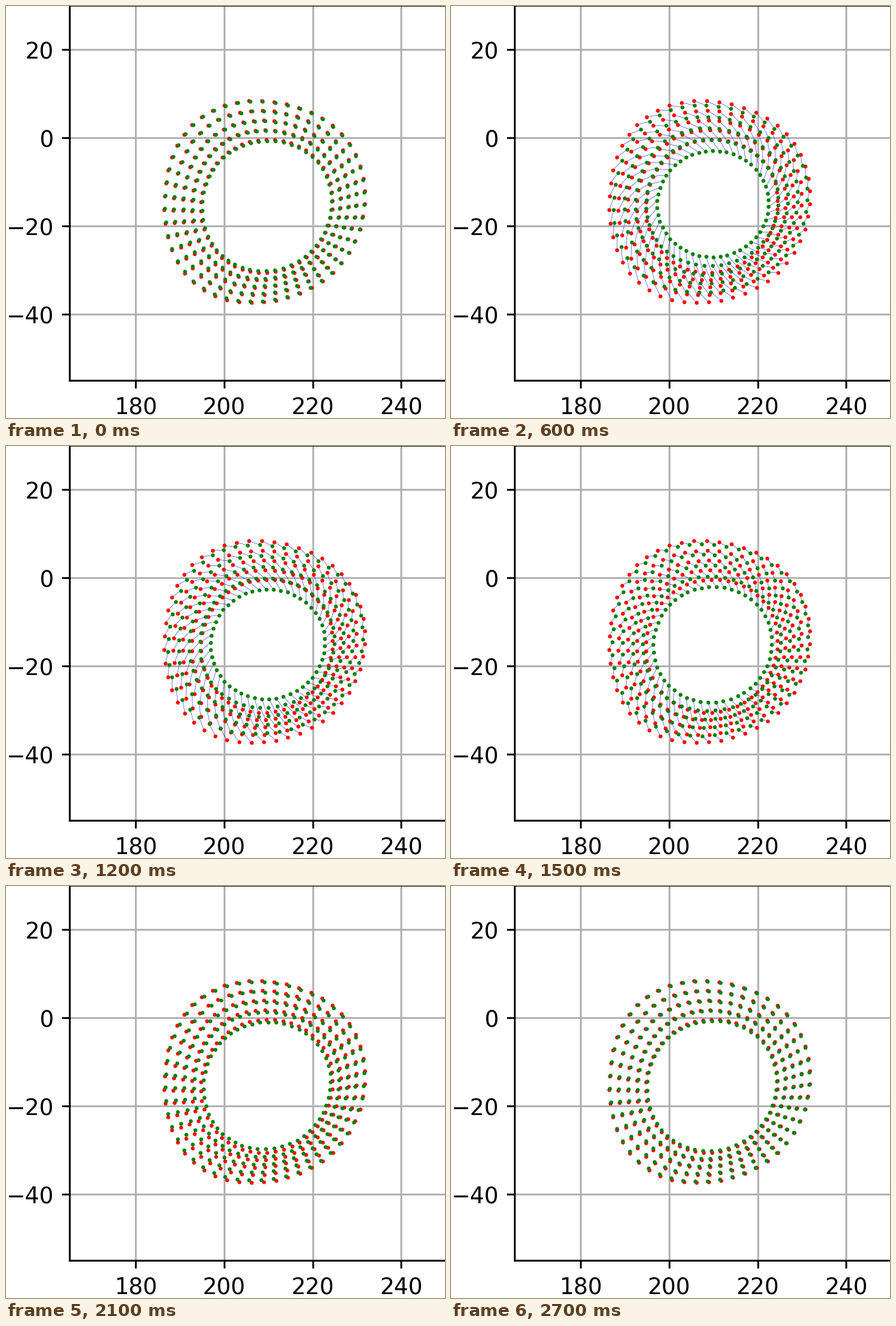
Recreate the animation shown at these times as a matplotlib script. Size 678 by 635 pixels, loop 2850 ms.

```python
import numpy as np
import matplotlib.pyplot as plt
from matplotlib.animation import FuncAnimation
from matplotlib.collections import LineCollection

WIDTH, HEIGHT, DPI = 678, 635, 250
RINGS, SPOKES = 5, 50

# Contraction of the ring over one cycle, one value per 150 ms step
CYCLE = [.08, .17, .36, .58, .78, .93, 1, .85, .67, .57,
         .50, .44, .38, .27, .17, .13, .10, .085, .08]

# Resting contours, counter-clockwise from the top, every fifth spoke
OUTER = [208.46 + 8.31j, 194.85 + 4.78j, 187.39 - 7.28j, 187.24 - 22.57j,
         195.44 - 34.49j, 208.90 - 37.28j, 222.22 - 32.43j, 230.71 - 20.66j,
         230.71 - 6.54j, 222.08 + 4.49j]
INNER = [209.49 - 0.37j, 200.85 - 3.31j, 195.59 - 10.51j, 195.44 - 20.81j,
         200.85 - 28.31j, 209.64 - 30.51j, 218.56 - 27.13j, 223.54 - 19.78j,
         223.98 - 10.37j, 218.42 - 2.87j]

spoke_angle = 2 * np.pi * np.arange(SPOKES) / SPOKES


def smooth_contour(anchors):
    """Closed Fourier curve: a circle (harmonic 1) plus its neighbours."""
    coeffs = np.fft.fft(anchors) / len(anchors)
    return sum(coeffs[f] * np.exp(1j * f * spoke_angle)
               for f in range(-3, 6))


def ellipse(center, rx, ry, turn):
    angle = spoke_angle + np.radians(turn)
    return center - rx * np.sin(angle) + 1j * ry * np.cos(angle)


def squeeze(contour, center, new_center, sx, sy, turn):
    """Rotate a contour about its center, then scale and shift it."""
    turned = (contour - center) * np.exp(1j * np.radians(turn))
    return new_center + sx * turned.real + 1j * sy * turned.imag


def fill_wall(outer, inner):
    """Evenly spaced rings between two contours, as one flat array."""
    depth = np.linspace(0, 1, RINGS)[:, None]
    return (outer + depth * (inner - outer)).ravel()


outer = smooth_contour(OUTER)
rest = fill_wall(outer, smooth_contour(INNER))
peak = fill_wall(
    squeeze(outer, 209.2 - 14.49j, 209.5 - 13.95j, 0.952, 0.91, -8.3),
    ellipse(209.93 - 14.85j, 12.0, 11.25, -9.6))

fig = plt.figure(figsize=(WIDTH / DPI, HEIGHT / DPI), dpi=DPI,
                 facecolor="white")
ax = fig.add_axes([97.8 / WIDTH, 58 / HEIGHT, 580.8 / WIDTH, 578 / HEIGHT])
ax.set(xlim=(165, 250), ylim=(-55, 30),
       xticks=range(180, 241, 20), yticks=range(-40, 21, 20))
ax.tick_params(labelsize=10, labelfontfamily="DejaVu Sans")
ax.grid(True)

dot = dict(ls="", marker="o", ms=1.75, mew=0)
trails = ax.add_collection(
    LineCollection([], colors="blue", linewidths=0.14, zorder=2),
    autolim=False)
ax.plot(rest.real, rest.imag, color="red", zorder=3, **dot)
moving, = ax.plot([], [], color="green", zorder=4, **dot)


def update(step):
    now = rest + CYCLE[step] * (peak - rest)
    moving.set_data(now.real, now.imag)
    ends = np.stack([rest, now], axis=1)
    trails.set_segments(np.stack([ends.real, ends.imag], axis=2))
    return trails, moving


anim = FuncAnimation(fig, update, frames=len(CYCLE), interval=150,
                     repeat=True, repeat_delay=0, blit=False)
plt.show()
```
